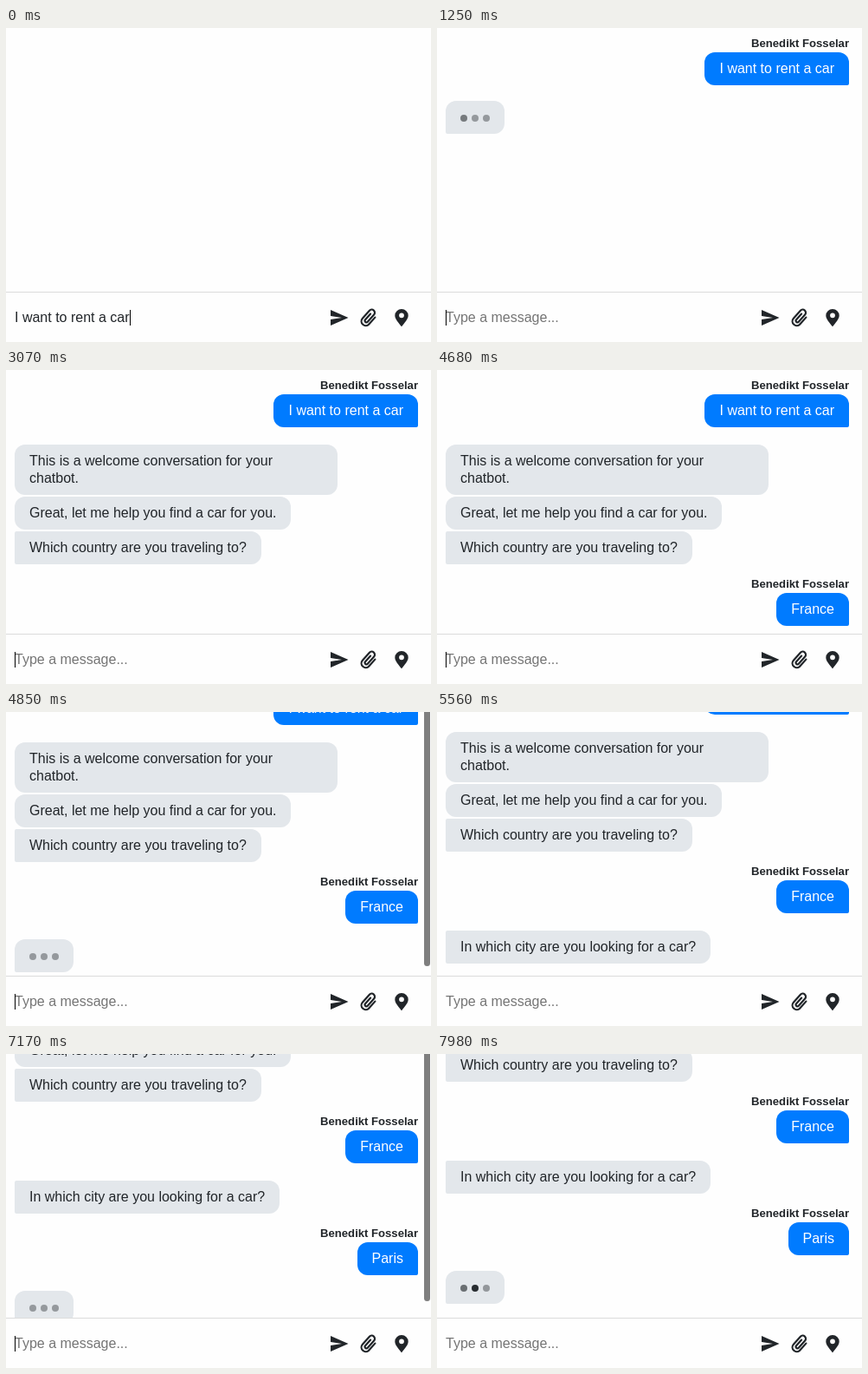
Recreate the animation shown at these times as an HTML page. Size 491x362 px, loop 8000 ms.

```html
<!DOCTYPE html>
<html lang="en">
<head>
<meta charset="utf-8">
<title>Chat</title>
<style>
  html, body { margin: 0; width: 100%; height: 100%; overflow: hidden; background: #fefefe; }
  body { position: relative; font: 16px/20px "Liberation Sans", Arial, sans-serif; color: #212529; }
  #view { position: absolute; left: 0; top: 0; width: 491px; height: 304px; overflow: hidden; }
  #list { position: absolute; left: 0; top: 0; width: 491px; height: 500px; }
  .bubble, .name { position: absolute; }
  .bubble { left: 10px; box-sizing: border-box; max-width: 373px; padding: 9px 17px; border-radius: 12px; background: #e3e7eb; }
  .own { left: auto; right: 15px; background: #007bff; color: #fff; border-bottom-right-radius: 2px; }
  .last { border-top-left-radius: 2px; border-bottom-left-radius: 2px; }
  .name { right: 15px; font-size: 13.12px; font-weight: bold; white-space: nowrap; }
  #typing { width: 68px; height: 38px; border-bottom-left-radius: 2px; }
  #typing i { position: absolute; top: 16px; width: 8px; height: 8px; border-radius: 50%; background: #212529; }
  #bar { position: absolute; left: 483px; top: -119px; width: 7px; border-radius: 4px; background: #7f7f7f; }
  #line { position: absolute; left: 0; top: 304px; width: 491px; height: 1px; background: #dcdcdc; }
  #input { position: absolute; left: 10px; top: 324px; white-space: pre; }
  #input.empty { color: #757575; }
  #caret { position: absolute; top: 325px; width: 1px; height: 18px; background: #000; }
  svg { position: absolute; left: 370px; top: 320px; }
</style>
</head>
<body>
<div id="view">
  <div id="list">
    <div id="typing" class="bubble"><i style="left:17px"></i><i style="left:30px"></i><i style="left:43px"></i></div>
  </div>
  <div id="bar"></div>
</div>
<div id="line"></div>
<div id="input"></div>
<div id="caret"></div>
<svg width="100" height="28" viewBox="370 320 100 28" fill="#212529">
  <path d="M375 325L395.5 334L375 343V336L388 334L375 332Z"/>
  <path transform="translate(419.3 334) rotate(42)" fill="none" stroke="#212529" stroke-width="2.2" stroke-linecap="round"
    d="M5 -5V5.5A5 5 0 0 1 -5 5.5V-6.5A3.5 3.5 0 0 1 2 -6.5V4.5A1.8 1.8 0 0 1 -1.6 4.5V-4.5"/>
  <path fill-rule="evenodd" d="M457 344.3C453.5 339.7 449.3 335.3 449.3 331.4A7.7 7.4 0 0 1 464.7 331.4C464.7 335.3 460.5 339.7 457 344.3ZM457 328.4A2.9 2.9 0 1 0 457 334.2A2.9 2.9 0 1 0 457 328.4Z"/>
</svg>
<script>
const LOOP = 8000, USER = 'Benedikt Fosselar';
const $ = id => document.getElementById(id);
const list = $('list'), typing = $('typing'), bar = $('bar'), input = $('input'), caret = $('caret');
const dots = [...typing.children];

// [time, top, text, class]
const messages = [
  [830, 28, 'I want to rent a car', 'own'],
  [2890, 86, 'This is a welcome conversation for your chatbot.', ''],
  [2980, 146, 'Great, let me help you find a car for you.', ''],
  [3070, 186, 'Which country are you traveling to?', 'last'],
  [4680, 257, 'France', 'own'],
  [5560, 315, 'In which city are you looking for a car?', 'last'],
  [7050, 386, 'Paris', 'own']
];
// [from, to, top, blink start]
const waits = [[830, 2890, 84, 1155], [4680, 5560, 313, 5000], [7050, 8000, 442, 7297]];
// [from, to, start offset, end offset]
const scrolls = [[4680, 4845, 0, 63], [5560, 5670, 63, 65], [7050, 7215, 65, 192]];
// [shown, fade start, fade end]
const bars = [[4740, 5270, 5500], [5620, 6160, 6400], [7110, 7680, 7920]];
const typed = [
  [0, 'I want to rent a car'], [830, ''],
  [3490, 'F'], [3670, 'Fr'], [3720, 'Fra'], [3900, 'Fran'], [4380, 'France'], [4680, ''],
  [6160, 'P'], [6280, 'Pa'], [6390, 'Par'], [6570, 'Pari'], [6750, 'Paris'], [7050, '']
];
const caretOff = [[120, 650], [1360, 1890], [2310, 2800], [3310, 3490], [5210, 5680], [7580, 8000]];

function add(cls, top, text) {
  const el = document.createElement('div');
  el.className = cls;
  el.style.top = top + 'px';
  el.textContent = text;
  list.append(el);
  return el;
}

const shown = messages.map(([at, top, text, cls]) => {
  const els = [add('bubble ' + cls, top, text)];
  if (cls === 'own') els.push(add('name', top - 20, USER));
  return { at, els };
});

const within = t => ([from, to]) => t >= from && t < to;
const clamp = x => Math.min(1, Math.max(0, x));
const smooth = x => x * x * (3 - 2 * x);
const bezier = (a, b, u) => 3 * a * u * (1 - u) ** 2 + 3 * b * u * u * (1 - u) + u ** 3;

// CSS "ease" timing
function ease(x) {
  let lo = 0, hi = 1;
  for (let i = 0; i < 18; i++) {
    const mid = (lo + hi) / 2;
    if (bezier(.25, .25, mid) < x) lo = mid; else hi = mid;
  }
  return bezier(.1, 1, lo);
}

function blink(ms) {
  if (ms < 0) return .4;
  const p = ms % 1000 / 500;
  return .4 + .6 * (p < 1 ? ease(p) : 1 - ease(p - 1));
}

function scrollAt(t) {
  const s = scrolls.filter(s => t >= s[0]).pop();
  if (!s) return [0, 63];
  const [from, to, a, b] = s;
  const step = Math.floor((t - from) / 60) * 60;
  return [Math.round(a + (b - a) * smooth(clamp(step / (to - from)))), b];
}

function draw(t) {
  for (const { at, els } of shown)
    for (const el of els) el.style.display = t >= at ? '' : 'none';

  const wait = waits.find(within(t));
  typing.style.display = wait ? '' : 'none';
  if (wait) {
    typing.style.top = wait[2] + 'px';
    dots.forEach((dot, i) => dot.style.opacity = blink(t - wait[3] - i * 333.3));
  }

  const [offset, end] = scrollAt(t);
  list.style.top = -offset + 'px';
  const b = bars.find(([from, , to]) => t >= from && t < to);
  bar.style.opacity = b ? 1 - clamp((t - b[1]) / (b[2] - b[1])) : 0;
  bar.style.height = 421 - (end - offset) * .74 + 'px';

  const text = typed.filter(k => t >= k[0]).pop()[1];
  input.className = text ? '' : 'empty';
  input.textContent = text || 'Type a message...';
  caret.style.left = Math.round(10 + (text ? input.getBoundingClientRect().width : 0)) + 'px';
  caret.style.display = caretOff.some(within(t)) ? 'none' : '';
}

const start = performance.now();
function frame() {
  draw((performance.now() - start) % LOOP);
  requestAnimationFrame(frame);
}
frame();
</script>
</body>
</html>
```
